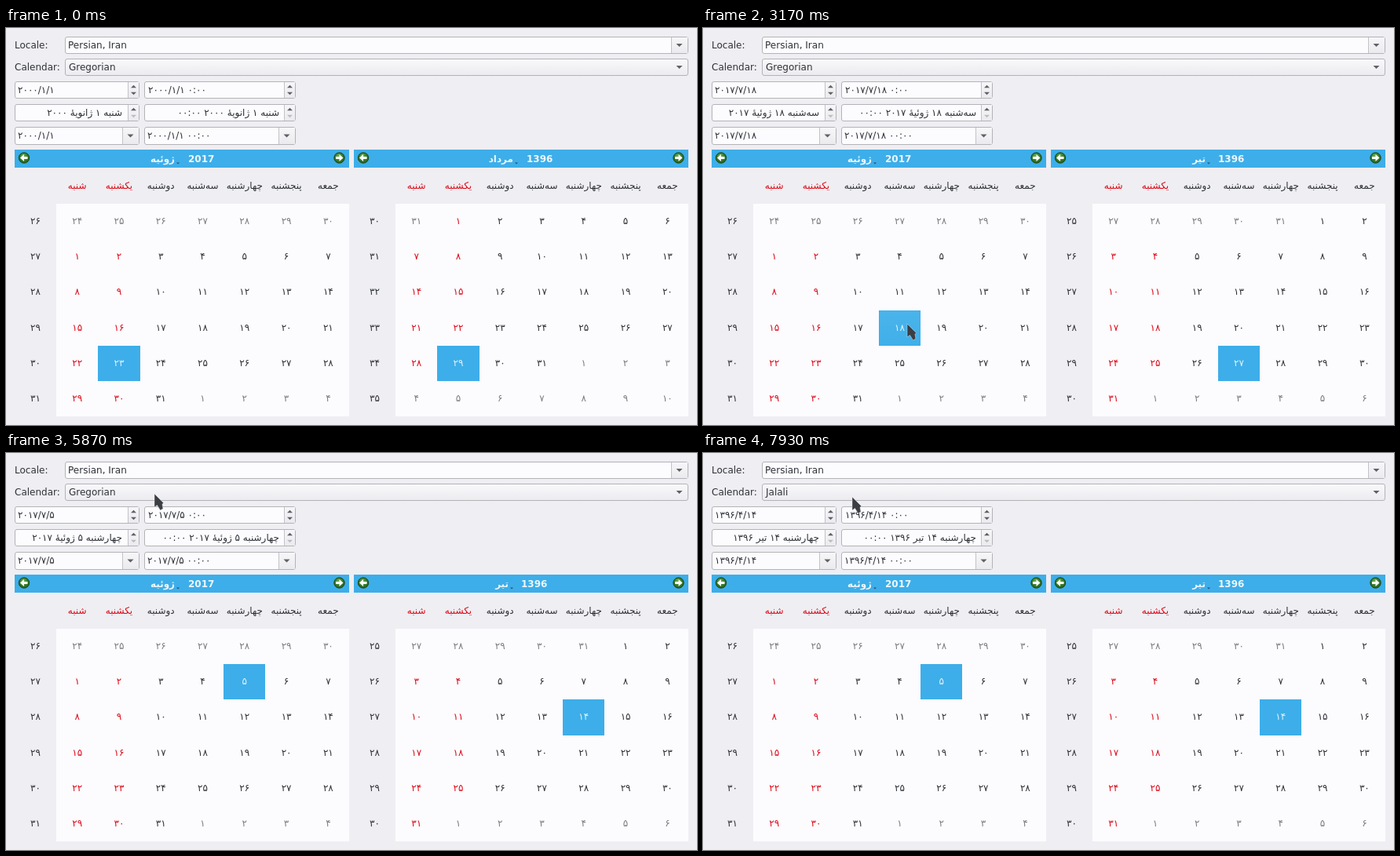
These frames come from a looping animation (880 px wide and 506 px high, 8000 ms). An HTML page with a canvas:

```html
<!DOCTYPE html>
<html lang="en">
<head>
<meta charset="utf-8">
<title>Calendar systems</title>
<style>
html, body { margin: 0; width: 100%; height: 100%; overflow: hidden; background: #efeef2; }
canvas { display: block; width: 880px; height: 506px; }
</style>
</head>
<body>
<canvas id="stage" width="880" height="506"></canvas>
<script>
const ctx = document.getElementById('stage').getContext('2d');
const LOOP = 8000;
const FONT = '12px "DejaVu Sans", sans-serif';
const BLUE = '#3daee9', INK = '#2e3237', RED = '#dc0a18', MUTED = '#7b7d80';
const BORDER = '#b4b4b8', PAPER = '#fcfbfe';
const DAYS = ['شنبه', 'یکشنبه', 'دوشنبه', 'سه\u200cشنبه', 'چهارشنبه', 'پنجشنبه', 'جمعه'];
const CELL_W = 373 / 7, CELL_H = 271 / 6, GRID_Y = 224;

// first: day number in the first cell, prev: length of the previous month
const JULY = { name: 'ژوئیه', year: 2017, first: 24, prev: 30, week: 26, nameX: 215, yearX: 232 };
const MORDAD = { name: 'مرداد', year: 1396, first: 31, prev: 31, week: 30, nameX: 646, yearX: 663 };
const TIR = { name: 'تیر', year: 1396, first: 27, prev: 31, week: 25, nameX: 640, yearX: 656 };

const july = (d, day) => ({ date: `2017/7/${d}`, long: `${DAYS[day]} ${d} ژوئیه\u0654 2017` });
const steps = [
  { t: 0, cal: 'Gregorian', left: 29, month: MORDAD, right: 29,
    date: '2000/1/1', long: 'شنبه 1 ژانویه\u0654 2000' },
  { t: 1930, cal: 'Gregorian', left: 9, month: TIR, right: 16, ...july(3, 2) },
  { t: 2830, cal: 'Gregorian', left: 24, month: TIR, right: 31, ...july(18, 3) },
  { t: 4470, cal: 'Gregorian', left: 11, month: TIR, right: 18, ...july(5, 4) },
  { t: 6670, cal: 'Jalali', left: 11, month: TIR, right: 18,
    date: '1396/4/14', long: 'چهارشنبه 14 تیر 1396' }
];
const hovers = [[1500, 2200, 9], [2230, 3620, 24], [3900, 5430, 11]];
const path = [
  [1330, 246, 392], [1620, 207, 296], [2010, 207, 296], [2170, 263, 356],
  [2350, 260, 377], [3480, 260, 377], [3950, 298, 290], [4170, 296, 288],
  [4700, 296, 288], [5000, 213, 178], [5130, 178, 60], [5200, 187, 62],
  [5430, 187, 62], [5800, 189, 52], [7150, 189, 52], [7500, 190, 56], [8000, 190, 56]
];

const persian = s => String(s).replace(/\d/g, d => String.fromCharCode(0x6f0 + +d));

function text(s, x, y, { color = INK, align = 'left', rtl = false, bold = false } = {}) {
  ctx.font = (bold ? 'bold ' : '') + FONT;
  ctx.fillStyle = color;
  ctx.textAlign = align;
  ctx.direction = rtl ? 'rtl' : 'ltr';
  ctx.fillText(s, x, y);
}

function fade(y, h, top, bottom) {
  const g = ctx.createLinearGradient(0, y, 0, y + h);
  g.addColorStop(0, top);
  g.addColorStop(1, bottom);
  return g;
}

function frame(x, y, w, h, fill, stroke = BORDER) {
  ctx.beginPath();
  ctx.roundRect(x + 0.5, y + 0.5, w, h, 2.5);
  ctx.fillStyle = fill;
  ctx.fill();
  ctx.lineWidth = 1;
  ctx.strokeStyle = stroke;
  ctx.stroke();
}

function poly(points, color) {
  ctx.beginPath();
  points.forEach(([x, y]) => ctx.lineTo(x, y));
  ctx.closePath();
  ctx.fillStyle = color;
  ctx.fill();
}

// dir: 1 points down, -1 points up
function chevron(x, y, w, dir, color = '#5f6164') {
  const h = w / 4 * dir;
  poly([[x - w / 2, y - h], [x + w / 2, y - h], [x, y + h]], color);
}

// Input with a button strip at its right end
function field(x, y, w, h, strip) {
  frame(x, y, w, h, PAPER);
  const sx = x + w - strip;
  ctx.fillStyle = fade(y, h, '#f7f6f9', '#ebeaee');
  ctx.fillRect(sx + 1, y + 1, strip - 1, h - 1);
  ctx.fillStyle = '#c3c3c7';
  ctx.fillRect(sx, y + 1, 1, h - 1);
}

function combo(x, y, w, h) {
  field(x, y, w, h, 21);
  chevron(x + w - 10.5, y + h / 2 + 0.5, 8, 1);
}

function spin(x, y, w, downColor) {
  field(x, y, w, 21, 14);
  chevron(x + w - 6.5, y + 6.5, 7, -1);
  chevron(x + w - 6.5, y + 15.5, 7, 1, downColor);
}

function form(s) {
  text('Locale:', 11, 26);
  combo(75, 11, 793, 21);
  text('Persian, Iran', 79, 26);
  text('Calendar:', 11, 54);
  frame(75, 39, 793, 21, fade(39, 21, '#f9f8fb', '#ecebef'));
  chevron(857.5, 50, 8, 1);
  text(s.cal, 80, 54);

  const date = persian(s.date), long = persian(s.long);
  [[11, 158], [176, 192]].forEach(([x, w], i) => {
    spin(x, 68, w);
    spin(x, 97, w, '#bdbdc1');
    combo(x, 126, w, 22);
    text(date + (i ? persian(' 0:00') : ''), i ? 181 : 15, 83);
    text(long + (i ? persian(' 00:00') : ''), i ? 348 : 148, 112, { align: 'right', rtl: true });
    text(date + (i ? persian(' 00:00') : ''), i ? 180 : 15, 141);
  });
}

function navButton(x, dir) {
  const y = 165.5;
  const g = ctx.createRadialGradient(x - 1, y - 3, 1, x, y, 7.5);
  g.addColorStop(0, '#63a94a');
  g.addColorStop(1, '#1c5a17');
  ctx.beginPath();
  ctx.arc(x, y, 6.7, 0, 7);
  ctx.fillStyle = g;
  ctx.fill();
  ctx.lineWidth = 1;
  ctx.strokeStyle = '#1b481a';
  ctx.stroke();
  poly([[5, 0], [0, -4.6], [0, -1.5], [-4.5, -1.5], [-4.5, 1.5], [0, 1.5], [0, 4.6]]
    .map(([px, py]) => [x + px * dir, y + py]), '#fff');
}

function cellBox(x0, i) {
  const col = i % 7, row = Math.floor(i / 7);
  const x = Math.round(x0 + col * CELL_W), y = Math.round(GRID_Y + row * CELL_H);
  return [x, y, Math.round(x0 + (col + 1) * CELL_W) - x,
    Math.round(GRID_Y + (row + 1) * CELL_H) - y];
}

function calendar(x, m, picked, hover) {
  ctx.fillStyle = BLUE;
  ctx.fillRect(x, 155, 426, 23);
  navButton(x + 12, -1);
  navButton(x + 413.5, 1);
  const title = '#eef6fb';
  text(m.name, m.nameX, 171, { color: title, align: 'right', rtl: true, bold: true });
  text(m.year, m.yearX, 171, { color: title, bold: true });
  chevron(m.nameX + 4, 172.5, 4, 1, '#27546e');

  const x0 = x + 53;
  ctx.fillStyle = PAPER;
  ctx.fillRect(x0, GRID_Y, 373, 271);
  const mid = c => x0 + (c + 0.5) * CELL_W;
  const centred = color => ({ color, align: 'center', rtl: true });
  DAYS.forEach((d, c) => text(d, mid(c), 205, centred(c < 2 ? RED : INK)));

  if (hover >= 0 && hover !== picked) {
    const [cx, cy, w, h] = cellBox(x0, hover);
    frame(cx, cy, w - 1, h - 1, fade(cy, h, '#f6f9fc', '#e4eff5'), '#b5daec');
  }
  const [px, py, pw, ph] = cellBox(x0, picked);
  ctx.fillStyle = BLUE;
  ctx.fillRect(px, py, pw, ph);
  if (hover === picked) {
    ctx.fillStyle = fade(py, ph, '#4ab4eb', '#40afe9');
    ctx.fillRect(px + 1, py + 1, pw - 2, ph - 2);
  }

  const lead = m.prev - m.first + 1;
  for (let row = 0; row < 6; row++) {
    const y = Math.floor(GRID_Y + (row + 0.5) * CELL_H) + 4;
    text(persian(m.week + row), x + 26.5, y, centred(INK));
    for (let c = 0; c < 7; c++) {
      const i = row * 7 + c, n = i - lead;
      const inside = n >= 0 && n < 31;
      const day = n < 0 ? m.first + i : n % 31 + 1;
      const color = i === picked ? '#e3f2fb' : !inside ? MUTED : c < 2 ? RED : INK;
      text(persian(day), mid(c), y, centred(color));
    }
  }
}

function pointer(t) {
  const k = path.findIndex(p => p[0] > t);
  if (k < 1) return;
  const [ta, xa, ya] = path[k - 1], [tb, xb, yb] = path[k];
  const u = (t - ta) / (tb - ta), e = u * u * (3 - 2 * u);
  ctx.save();
  ctx.translate(xa + (xb - xa) * e, ya + (yb - ya) * e);
  poly([[0, 0], [0, 17], [3.5, 14.5], [7.5, 21], [11, 19], [10, 13.5], [11.5, 11.5]], '#3b3e43');
  ctx.lineWidth = 0.8;
  ctx.strokeStyle = 'rgba(240,240,244,.55)';
  ctx.stroke();
  ctx.restore();
}

function draw(t) {
  const s = steps.filter(p => p.t <= t).pop();
  const h = hovers.find(([a, b]) => t >= a && t < b);
  ctx.fillStyle = '#efeef2';
  ctx.fillRect(0, 0, 880, 506);
  form(s);
  calendar(11, JULY, s.left, h ? h[2] : -1);
  calendar(443, s.month, s.right, -1);
  pointer(t);
}

const start = performance.now();
function tick(now) {
  draw(Math.max(0, now - start) % LOOP);
  requestAnimationFrame(tick);
}
draw(0);
requestAnimationFrame(tick);
</script>
</body>
</html>
```
